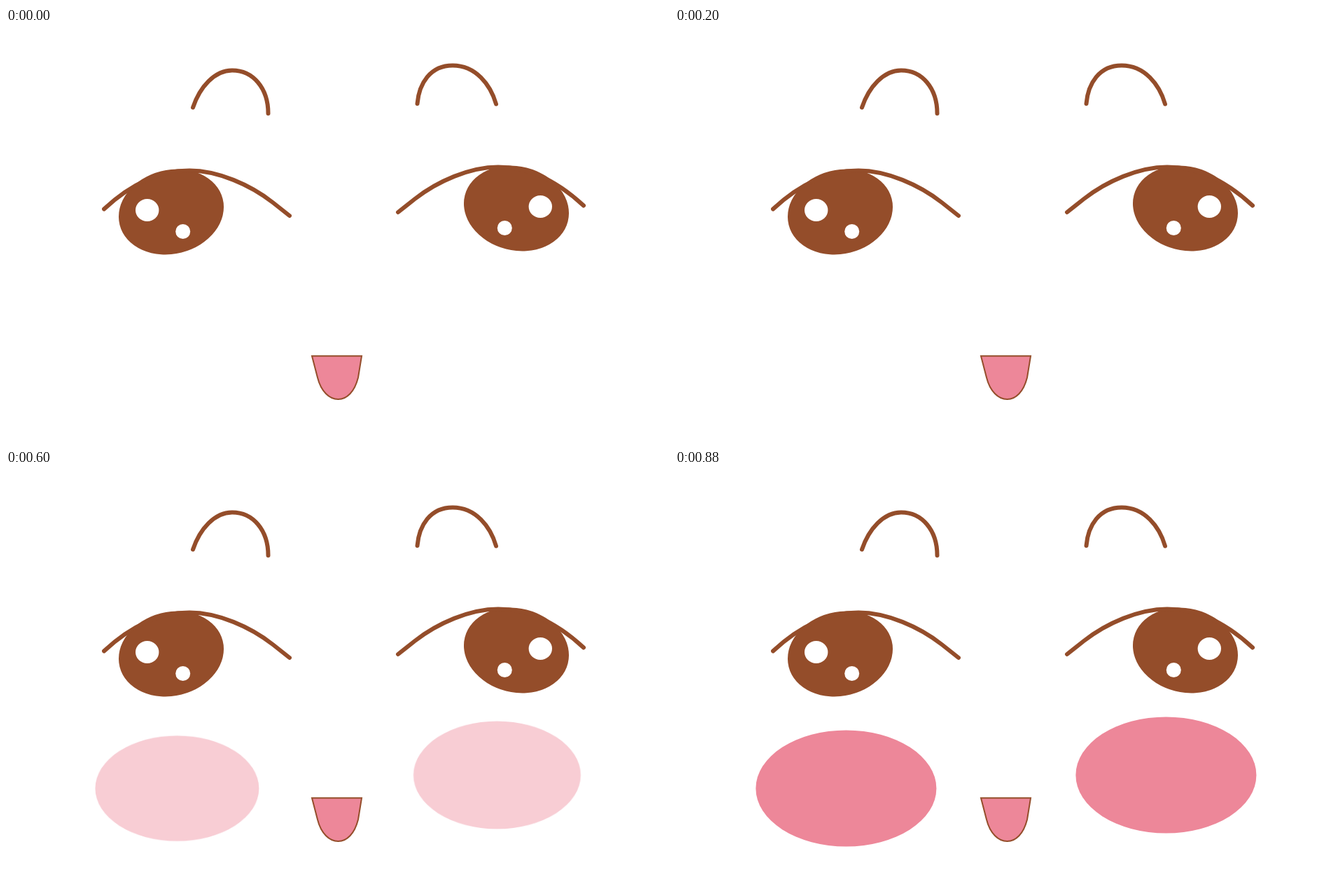
Recreate the animation shown at these times as an HTML page without scripts. Size 947 by 591 pixels, loop 1.2 s.

```html
<!DOCTYPE html>
<html lang="en">
<head>
<meta charset="utf-8">
<title>Winking, blushing face</title>
<style>
  html, body { margin: 0; width: 100%; height: 100%; overflow: hidden; background: #fff; }
  svg { display: block; width: 100%; height: 100%; }

  .line { fill: none; stroke: #944d2a; stroke-width: 6; stroke-linecap: round; stroke-linejoin: round; }
  .iris { fill: #944d2a; }
  .shine { fill: #fff; }
  .mouth { fill: #ed8799; stroke: #944d2a; stroke-width: 2; }

  .open { animation: open 1.2s step-end infinite; }
  .shut { animation: shut 1.2s step-end infinite; }
  @keyframes open {
    0%, 6.66%, 16.66%, 100% { opacity: 1; }
    3.33%, 13.33% { opacity: 0; }
  }
  @keyframes shut {
    0%, 6.66%, 16.66%, 100% { opacity: 0; }
    3.33%, 13.33% { opacity: 1; }
  }

  .cheek {
    fill: #ed8799;
    transform-box: fill-box;
    transform-origin: center;
    animation: blush 1.2s infinite;
  }
  @keyframes blush {
    0% { opacity: 0; transform: scale(var(--from)); animation-timing-function: step-end; }
    36.66% { opacity: .0833; transform: scale(var(--from)); animation-timing-function: steps(11, end); }
    73.33%, 100% { opacity: 1; transform: none; }
  }
</style>
</head>
<body>
<svg viewBox="0 0 947 591" preserveAspectRatio="none">
  <defs>
    <g id="eye">
      <ellipse class="iris" cx="236" cy="262.5" rx="75.9" ry="59.9" transform="rotate(-14.3 236 262.5)"/>
      <path class="line" d="M140 258.5C176 225 218 203.5 262 203.5C303 203.5 349 224 381 249L405 268"/>
      <ellipse class="shine" cx="201.7" cy="260" rx="16.7" ry="16"/>
      <circle class="shine" cx="252.7" cy="290.5" r="10.5"/>
    </g>
  </defs>

  <!-- brows -->
  <path class="line" d="M267 113.5C277 84 298 60.5 323 60.5C353 60.5 374.5 86 374.5 122"/>
  <path class="line" d="M587.5 108C590 79 606 53.5 638 53.5C671 53.5 692 81 700 108.5"/>

  <!-- eyes -->
  <use class="open" href="#eye"/>
  <path class="line shut" d="M124 290C190 238 320 238 390 290"/>
  <use href="#eye" transform="matrix(-1 0 0 1 965 -5)"/>

  <!-- cheeks -->
  <ellipse class="cheek" style="--from:.853" cx="244.4" cy="454.5" rx="129" ry="83"/>
  <ellipse class="cheek" style="--from:.884" cx="701.4" cy="435.5" rx="129" ry="83"/>

  <path class="mouth" d="M437 468.3H508L503 499C498 519 487 530 474.5 530C462 530 450 519 445 499Z"/>
</svg>
</body>
</html>
```
